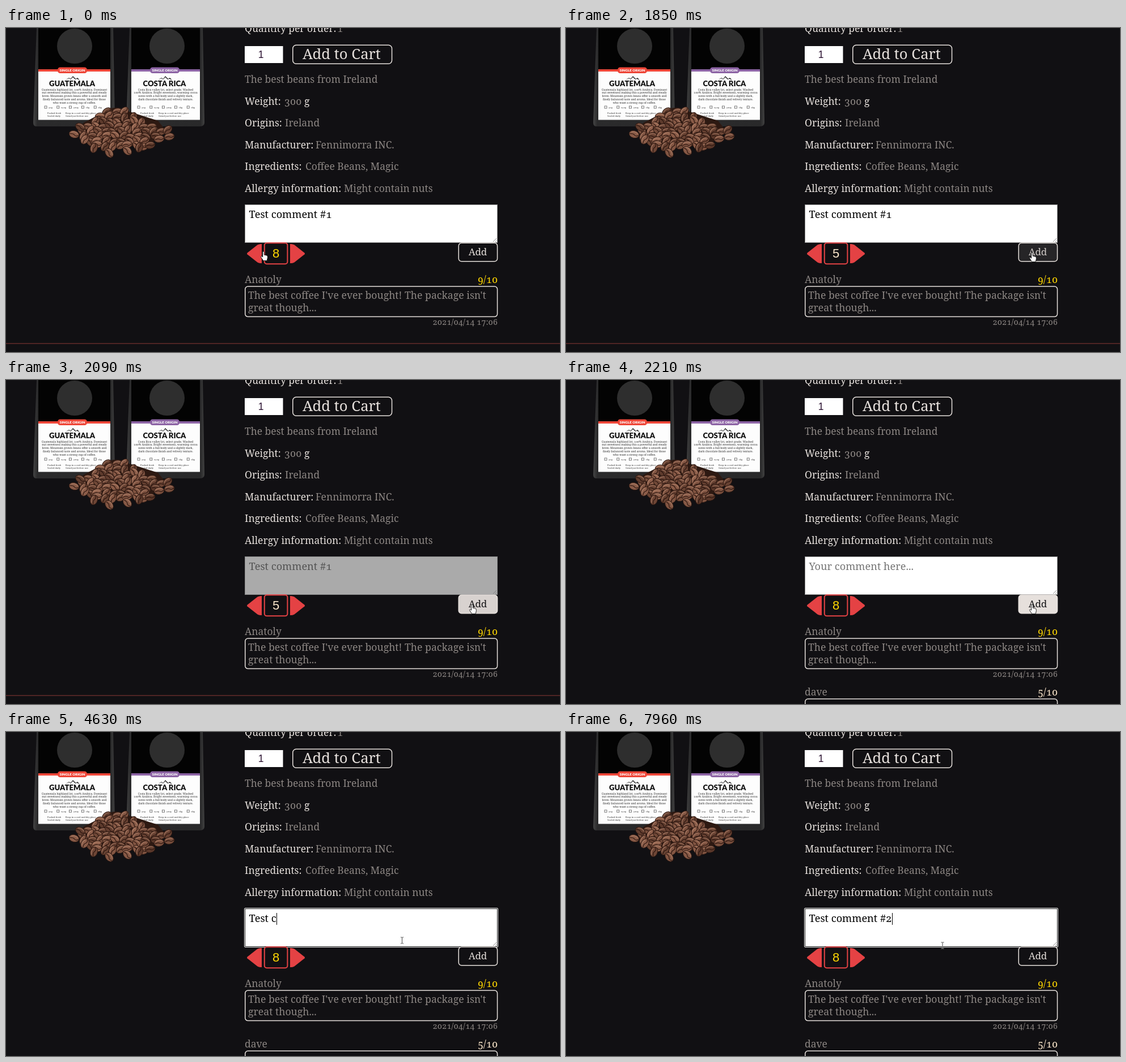
Recreate the animation shown at these times as an HTML page. Size 977 by 573 pixels, loop 8000 ms.

```html
<!DOCTYPE html>
<html lang="en">
<head>
<meta charset="utf-8">
<title>Product page</title>
<style>
  html, body { margin: 0; width: 100%; height: 100%; overflow: hidden; background: #111013; }
  svg { display: block; }
  text { font-family: "Noto Serif", serif; font-variant-numeric: oldstyle-nums; white-space: pre; }
  text.sans { font-family: "Liberation Sans", Arial, sans-serif; }
  text.title { font-family: Lato, sans-serif; font-weight: 900; }
</style>
</head>
<body>
<svg id="stage" width="977" height="573" viewBox="0 0 977 573">
  <defs>
    <linearGradient id="foil">
      <stop offset="0" stop-color="#454545"/><stop offset=".05" stop-color="#2b2b2c"/>
      <stop offset=".95" stop-color="#29292a"/><stop offset="1" stop-color="#424242"/>
    </linearGradient>
  </defs>
</svg>
<script>
const LOOP = 8000;
const BG = [17, 16, 19], LIGHT = [230, 224, 220];
const INK = '#e6e0dc', GREY = '#8c8683', GOLD = '#ffd700', PALE = '#fbe6cb', RED = '#e44244';
const SIZE = 17.45, ENTRY_SIZE = 18.15;
const stage = document.getElementById('stage');

function add(tag, attrs, parent = stage) {
  const el = document.createElementNS('http://www.w3.org/2000/svg', tag);
  set(el, attrs);
  return parent.appendChild(el);
}
function set(el, attrs) {
  for (const key in attrs) el.setAttribute(key, attrs[key]);
}
function label(x, y, str, fill, size = SIZE, attrs = {}, parent = stage) {
  const el = add('text', { x, y, fill, 'font-size': size, ...attrs }, parent);
  el.textContent = str;
  return el;
}
function box(x, y, width, height, attrs, parent) {
  return add('rect', { x, y, width, height, ...attrs }, parent);
}
const middle = { 'text-anchor': 'middle' }, end = { 'text-anchor': 'end' };
const outline = { rx: 5, fill: 'none', stroke: INK, 'stroke-width': 1.5 };
const mix = (a, b, k) => `rgb(${a.map((v, i) => Math.round(v + (b[i] - v) * k))})`;
const clamp = v => Math.max(0, Math.min(1, v));
const smooth = v => { const k = clamp(v); return k * k * (3 - 2 * k); };

// Seeded generator keeps the bean pile identical on every load.
let seed = 11;
function random() {
  seed = (seed * 16807) % 2147483647;
  return seed / 2147483647;
}

function drawBag(cx, left, right, color, title, lines) {
  const bag = add('g', {});
  const mid = (left + right) / 2, w = right - left;
  add('path', { d: `M${left - 3} 0H${right + 5}L${right + 8} 167Q${right + 8} 174 ${right} 174H${left - 4}Q${left - 9} 174 ${left - 9} 167Z`, fill: 'url(#foil)' }, bag);
  box(left, 0, w, 73, { fill: '#030303' }, bag);
  box(left, 75, w, 87.5, { fill: '#fdfdfd' }, bag);
  box(left, 73, w, 4, { fill: color }, bag);
  box(cx - 26, 69.5, 52, 10.5, { rx: 4.5, fill: color }, bag);
  add('circle', { cx: cx + 4, cy: 32, r: 31, fill: '#2e2e2e' }, bag);
  label(cx, 77.4, 'SINGLE ORIGIN', '#fff', 6.2, { ...middle, class: 'title' }, bag);
  add('path', { d: `M${cx - 12} 92l6 -4 3 2 4 -5 5 5 3 -2 4 4l-5 -2 -3 1 -4 -4 -4 4 -3 -2z`, fill: '#222' }, bag);
  label(cx - .5, 103, title, '#111', 13.1, { ...middle, class: 'title' }, bag);
  lines.forEach((line, i) => label(mid, 110.5 + i * 5.8, line, '#333', 4.9, middle, bag));
  ['50g', '250g', '500g', '1kg', '2kg'].forEach((weight, i) => {
    const x = left + 11 + i * 21.8;
    box(x, 138, 4, 4, { fill: 'none', stroke: '#444', 'stroke-width': .7 }, bag);
    label(x + 7, 142, weight, '#444', 4, {}, bag);
  });
  [['Packed fresh', 'Sealed daily'], ['Keep in a cool and dry place', 'Grind just before use']]
    .forEach((column, i) => column.forEach((line, j) =>
      label(left + 16 + i * 32, 152 + j * 4.5, line, '#333', 4, {}, bag)));
}

function drawBean(x, y) {
  const bean = add('g', { transform: `translate(${x} ${y}) rotate(${random() * 130 - 75})` });
  add('ellipse', { rx: 9, ry: 6.4, fill: mix([92, 57, 43], [146, 98, 77], random()), stroke: '#2a1711', 'stroke-width': .9 }, bean);
  add('path', { d: 'M-6 -2.5Q0 -6 6 -2.5', fill: 'none', stroke: '#b98d75', 'stroke-width': 1.5, opacity: .55 }, bean);
  add('path', { d: 'M-7.5 1Q-2 -1.5 1 1T8 0', fill: 'none', stroke: '#2b150f', 'stroke-width': 1.2 }, bean);
}

function drawBeans() {
  add('path', { d: 'M180 145Q194 136 212 146L268 164 284 184 260 201 215 211 160 203 128 188 136 168Z', fill: '#2d1912' });
  for (let y = 148; y < 208; y += 8.5) {
    const spread = clamp((y - 146) / 34), taper = Math.max(0, y - 188);
    const from = 181 - 50 * spread + taper * 1.3, to = 208 + 66 * spread - taper * 1.6;
    for (let x = from; x <= to; x += 14) drawBean(x + random() * 5, y + random() * 5 - 2);
  }
  [[120, 188], [139, 197], [155, 212], [182, 221], [214, 217], [235, 211], [254, 207], [270, 196], [288, 192], [285, 180], [131, 175]]
    .forEach(([x, y]) => drawBean(x, y));
}

function drawProduct() {
  drawBag(117, 57, 184, '#ee4638', 'GUATEMALA', [
    'Guatemala highland lot, 100% Arabica. Dominant',
    'nut sweetness making this a powerful and steady',
    'brew. Mountain grown beans offer a smooth and',
    'finely balanced taste and aroma. Ideal for those',
    'who want a strong cup of coffee.']);
  drawBag(280, 221, 342, '#8d64a5', 'COSTA RICA', [
    'Costa Rica valley lot, select grade. Washed',
    '100% Arabica. Bright sweetness, warming cocoa',
    'notes with a full body and a slightly dark,',
    'dark chocolate finish and velvety texture.']);
  drawBeans();
}

function drawDetails() {
  const rows = [
    [7, 'Quantity per order:', 584, '1'],
    [136, 'Weight:', 491, '300'],
    [174, 'Origins:', 492, 'Ireland'],
    [213, 'Manufacturer:', 546, 'Fennimorra INC.'],
    [251, 'Ingredients:', 528, 'Coffee Beans, Magic'],
    [290, 'Allergy information:', 596, 'Might contain nuts']];
  for (const [y, name, x, value] of rows) {
    label(421, y, name, INK);
    label(x, y, value, GREY);
  }
  label(526, 136, 'g', INK);
  label(421, 97, 'The best beans from Ireland', GREY);
  box(421, 32, 67.5, 30, { fill: '#fff' });
  label(449.5, 53, '1', '#2a1030', 17.5, { ...middle, class: 'sans' });
  box(505.75, 30.25, 174.8, 33, { ...outline, rx: 6 });
  label(523, 55, 'Add to Cart', INK, 25.7);
}

function drawComment(y, name, score, color, parent) {
  label(421, y, name, GREY, SIZE, {}, parent);
  label(867, y, score, color, SIZE, { ...end, 'font-weight': 500 }, parent);
  box(421.75, y + 6, 444.8, 53.6, outline, parent);
}

drawProduct();
drawDetails();

const area = box(421.5, 312.5, 445, 67, {});
const ring = box(420.5, 311.5, 447, 69, { rx: 1.5, fill: 'none', stroke: '#fff' });
add('path', { d: 'M859 378l6 -6M863 378l2 -2', stroke: '#777', 'stroke-width': .8 });
const entry = label(428.5, 336, '', '#000', ENTRY_SIZE);
const caret = box(0, 320, 1, 21, { fill: '#000' });

const arrow = 'M425.5 397.8L443.5 383.6Q447 381.6 451 382V416Q447 416.4 443.5 414.4L425.5 400.2Q424.5 399 425.5 397.8Z';
const leftArrow = add('path', { d: arrow });
add('path', { d: arrow, fill: RED, transform: 'translate(952) scale(-1 1)' });
box(455.8, 380.3, 40.6, 37, { rx: 4, fill: 'none', stroke: RED, 'stroke-width': 2 });
const rating = label(476, 406, '', GOLD, 22, { ...middle, class: 'sans' });
const button = box(798.25, 380.25, 68.3, 32.5, outline);
const buttonText = label(832, 402, 'Add', INK, 17, middle);

drawComment(451, 'Anatoly', '9/10', GOLD);
label(427, 479, "The best coffee I've ever bought! The package isn't", GREY, 17.65);
label(427, 501, 'great though...', GREY, 17.65);
label(867, 525, '2021/04/14 17:06', GREY, 14.2, end);
const footer = box(0, 557.5, 977, 1, { fill: '#8e3a37' });
const posted = add('g', {});
drawComment(558, 'dave', '5/10', PALE, posted);

const hand = add('path', {
  d: 'M3.4 1.3Q3.4 0 4.7 0T6 1.3V6.2L10.6 7.2Q12 7.6 12 9.2V11.6L10.8 16.5H4.4L.6 10.6Q-.2 9 1.1 8.5 2 8.5 3.4 10.2Z',
  fill: '#fff', stroke: '#111', 'stroke-width': .9 });
const beam = add('path', {
  d: 'M-2.5 -5.5H-.7L0 -5 .7 -5.5H2.5M0 -5V5M-2.5 5.5H-.7L0 5 .7 5.5H2.5',
  fill: 'none', stroke: '#bbb', style: 'mix-blend-mode:difference' });

const PATH = [
  [0, 454, 395], [60, 454, 395], [300, 440, 397], [1430, 440, 397],
  [1790, 816, 398], [1850, 822, 397], [2460, 822, 397], [2760, 698.5, 368.5],
  [7850, 698.5, 368.5], [7960, 664, 377.5], [LOOP, 664, 377.5]];
const SCORES = [[0, 8], [360, 7], [740, 6], [1240, 5], [2210, 8]];
const TYPING = [
  [2210, 0], [3660, 1], [3890, 2], [3990, 3], [4090, 4], [4190, 5], [4630, 6], [4690, 7],
  [4880, 8], [5000, 9], [5120, 10], [5240, 11], [5360, 12], [5480, 13], [5890, 14]];

const latest = (list, t) => list.filter(item => item[0] <= t).pop()[1];

function pointer(t) {
  const i = PATH.findIndex(p => p[0] > t);
  const [a, b] = [PATH[i - 1], PATH[i]];
  const k = (t - a[0]) / (b[0] - a[0]);
  return [a[1] + (b[1] - a[1]) * k, a[2] + (b[2] - a[2]) * k];
}

function typed(t) {
  if (t < 2210) return 'Test comment #1';
  if (t >= 7520) return 'Test comment #2';
  if (t >= 7020 && t < 7330) return 'Test comment # ';
  return 'Test comment #'.slice(0, latest(TYPING, t));
}

const show = (el, on) => set(el, { visibility: on ? 'visible' : 'hidden' });

function render(t) {
  const sent = t >= 2210, busy = t >= 2090 && !sent, focused = t >= 2790;
  const str = typed(t), score = latest(SCORES, t);

  entry.textContent = str;
  const caretX = 428.5 + (str ? entry.getComputedTextLength() : 0);
  set(caret, { x: Math.round(caretX) });
  show(caret, focused && !(t >= 3350 && t < 3660) && !(t >= 6410 && t < 6960));
  if (!str) entry.textContent = 'Your comment here...';
  set(entry, { fill: busy ? '#545454' : str ? '#000' : '#757575' });
  set(area, { fill: busy ? '#aaa' : '#fff', stroke: focused ? '#101010' : '#858585' });
  show(ring, focused);

  rating.textContent = score;
  set(rating, { fill: score >= 8 ? GOLD : PALE });
  set(leftArrow, { fill: t >= 120 && t < 1490 ? '#eb4c4a' : RED });

  const hover = smooth((t - 1790) / 310) * (1 - smooth((t - 2520) / 270));
  set(button, { fill: mix(BG, busy ? [216, 210, 207] : LIGHT, hover) });
  set(buttonText, { fill: mix(LIGHT, BG, hover) });

  show(footer, !sent);
  show(posted, sent);

  const [x, y] = pointer(t), overText = t >= 2640;
  set(hand, { transform: `translate(${x - 4.7} ${y})` });
  set(beam, { transform: `translate(${x} ${y})` });
  show(hand, !overText);
  show(beam, overText);
}

const start = performance.now();
function frame() {
  render((performance.now() - start) % LOOP);
  requestAnimationFrame(frame);
}
frame();
</script>
</body>
</html>
```
